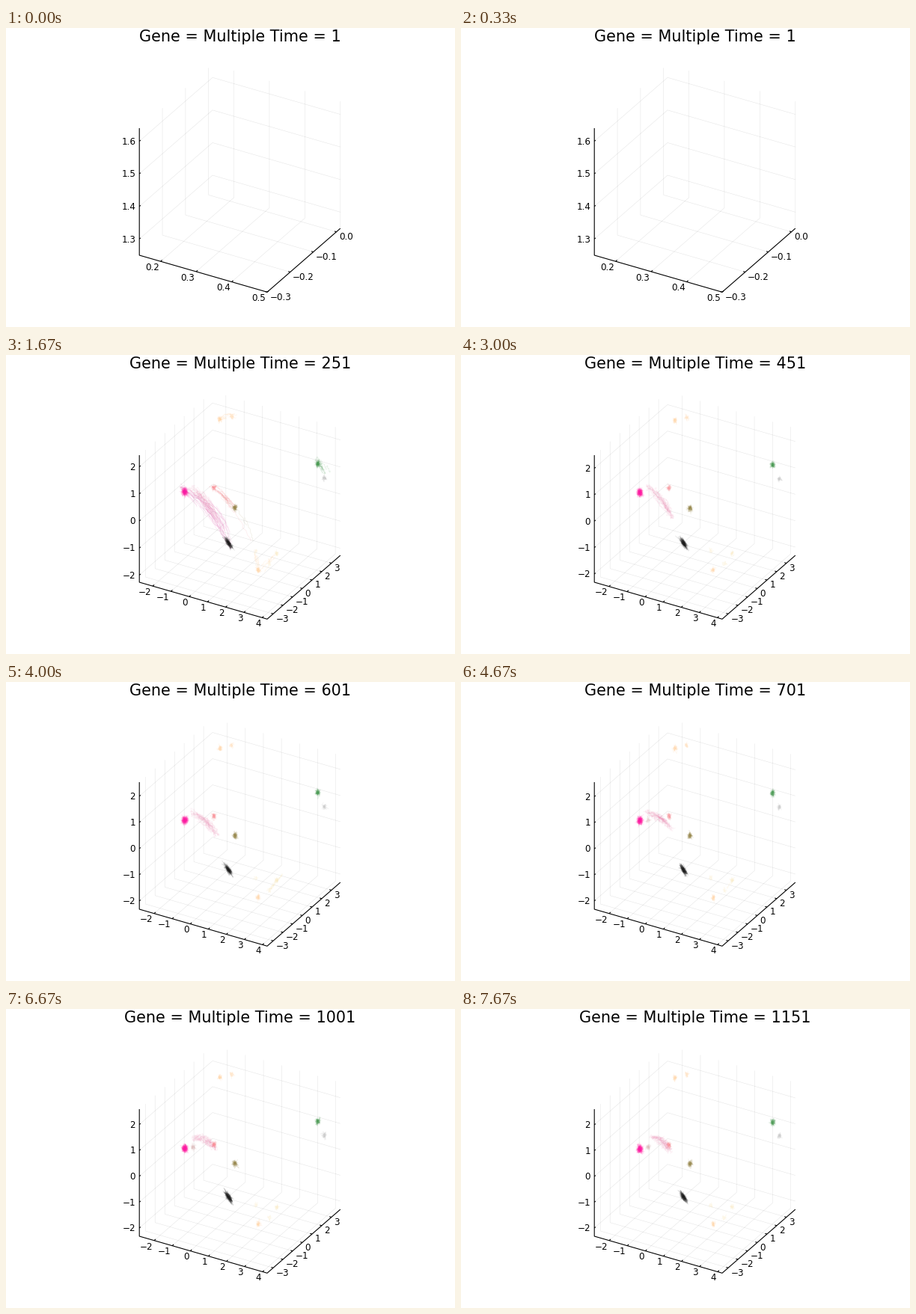
A matplotlib script that plays this animation: 600 by 400 pixels, repeating every 8 s.

```python
import numpy as np
import matplotlib.pyplot as plt
from matplotlib.animation import FuncAnimation
from matplotlib.collections import LineCollection

FRAMES, LOOP_MS, PX = 24, 8000, 0.72
TICK_SIZE, TITLE_SIZE = 11.9 * PX, 20.72 * PX

# Screen position of the box corner and its three edge vectors
ORIGIN = np.array([178.2, 304.0])
EX, EY, EZ = np.array([170.8, 49.3]), np.array([97.8, -85.2]), np.array([0, -170.0])

# Axis limits: at the start, once the trajectories have spread, in the long run
X_AXIS = (.14, .5), (-2.58, 4.28), (-2.82, 4.25)
Y_AXIS = (-.3, .017), (-3.62, 3.92), (-3.62, 3.92)
Z_AXIS = (1.25, 1.64), (-2.17, 2.38), (-2.32, 2.64)
START = .32, -.14, 1.44

MAGENTA, PINK, PURPLE, BLACK = "#ff1aa3", "#ee86b0", "#6e1457", "#111111"
ORCHID, RED, OLIVE, GREEN = "#dc3c9f", "#f9606a", "#85722a", "#2a8a35"
GREY, ORANGE, YELLOW, MAUVE, MIST = "#9a9a9a", "#ffbe72", "#f7d98a", "#c98f8f", "#8fa9a9"

# Steady states: colour, centre, number of walks, lean
CLUSTERS = [
    (MAGENTA, (239, 183), 42, 0), (BLACK, (297.5, 251.5), 28, 1.1), (RED, (278, 177), 9, 0),
    (OLIVE, (306, 204), 16, 0), (GREEN, (416.5, 145.5), 16, 0), (GREY, (425.5, 164.5), 6, 0),
    (ORANGE, (286, 86), 7, 0), (ORANGE, (301.5, 82), 4, 0), (ORANGE, (337, 288), 7, 0),
    (YELLOW, (362, 265), 4, 0), (YELLOW, (352, 279), 2, 0), (YELLOW, (334, 262), 2, 0),
]

# Passing flows: colour, start, end, bulge, number of trails, peak frame, duration
FLOWS = [
    (ORCHID, (235, 176), (300, 257), 17, 300, 2.8, 1.6),
    (PURPLE, (262, 211), (301, 258), 4, 50, 3, 1),
    (RED, (276, 177), (329, 250), 15, 36, 3, 1.2),
    (OLIVE, (290, 187), (329, 250), 9, 36, 3, 1.3),
    (RED, (277, 176), (306, 206), 3, 22, 5, 1.2),
    (MIST, (424, 146), (376, 213), -8, 44, 2.8, 1),
    (MIST, (376, 213), (348, 275), 6, 12, 2.8, 1),
    (GREEN, (415, 140), (428, 161), 2, 24, 4, 1.7),
    (ORANGE, (302, 258), (345, 287), 4, 26, 3, 1),
    (ORANGE, (340, 288), (360, 267), 2, 16, 3.8, 1.5),
    (ORANGE, (332, 262), (338, 287), 0, 8, 5, 1.3),
    (ORANGE, (284, 85), (307, 81), 3, 24, 3, 2),
    (YELLOW, (353, 278), (365, 259), 0, 9, 12, 1.5),
]


def ramp(k, first, last):
    return np.clip((k - first) / (last - first), 0, 1)


def limits(axis, k, settle):
    """Quick ease-out to the spread limits, then a slow creep to the final ones."""
    start, spread, final = np.array(axis)
    grow = 1 - (1 - ramp(k, 0, settle)) ** 2
    creep = 1 - np.exp(-max(k - 3, 0) / np.array([2, 10]))
    return start + (spread - start) * grow + (final - spread) * creep


def all_limits(k):
    return limits(X_AXIS, k, 3), limits(Y_AXIS, k, 3), limits(Z_AXIS, k, 2)


def ticks(lo, hi):
    """Fractions along the axis and labels of its ticks."""
    span = hi - lo
    step = .1 if span < 1 else .5 if span < 3 else 1
    values = np.arange(np.ceil(lo / step - 1e-6), np.floor(hi / step + 1e-6) + 1) * step
    text = "{:.0f}" if step == 1 else "{:.1f}"
    return [((v - lo) / span, text.format(v + 0.0).replace("-", "\u2212")) for v in values]


def at(u=0, v=0, w=0):
    return ORIGIN + u * EX + v * EY + w * EZ


def label(pos, text, align):
    ax.text(pos[0], pos[1] + 4.3, text, size=TICK_SIZE, ha=align, va="baseline")


def draw_axes(k):
    xlim, ylim, zlim = all_limits(k)
    grid, marks = [], [[at(w=1), at(), at(1), at(1, 1)]]
    for u, text in ticks(*xlim):
        grid.append([at(u), at(u, 1), at(u, 1, 1)])
        marks.append([at(u), at(u) + (2, -1.75)])
        label(at(u) + (-1.6, 7.5), text, "right")
    for v, text in ticks(*ylim):
        grid.append([at(1, v), at(0, v), at(0, v, 1)])
        marks.append([at(1, v), at(1, v) + (-2.6, -.75)])
        label(at(1, v) + (3.3, 6), text, "left")
    for w, text in ticks(*zlim):
        grid.append([at(0, 0, w), at(0, 1, w), at(1, 1, w)])
        marks.append([at(0, 0, w), at(0, 0, w) + (1.6, -1.3)])
        label(at(0, 0, w) + (-5, 0), text, "right")
    ax.add_collection(LineCollection(grid, colors="black", alpha=.1, linewidths=.55 * PX))
    ax.add_collection(LineCollection(marks, colors="black", linewidths=1.1 * PX))


def draw_trails(paths, colour):
    ax.add_collection(LineCollection(paths, colors=colour, alpha=.11, linewidths=.8 * PX))


def cluster(rng, centre, count, size, lean):
    """Random walks around a centre; busier clusters are a little larger."""
    walks = rng.normal(size=(count, 12, 2)) * (1.4 + .016 * size, 1.9 + .02 * size)
    walks[..., 0] *= 1 + .4 * lean
    walks[..., 1] += lean * walks[..., 0]
    return walks + centre


def flow(rng, start, end, bulge, count, jitter=.7):
    """Jittery trails along random stretches of arcs that bow out up to the bulge."""
    start, end = np.array(start, float), np.array(end, float)
    dx, dy = end - start
    normal = np.array([dy, -dx]) / np.hypot(dx, dy)
    paths = []
    for _ in range(count):
        a = rng.uniform(-.2, .65)
        s = np.clip(np.linspace(a, a + rng.uniform(.35, .6), 14), 0, 1)[:, None]
        arc = start + (end - start) * s + normal * bulge * rng.uniform() * np.sin(np.pi * s)
        paths.append(arc + rng.normal(0, 1.8, 2) + rng.normal(0, jitter, arc.shape))
    return paths


def fan(rng, start, end, count):
    s = np.linspace(0, 1, 20)[:, None]
    paths = []
    for _ in range(count):
        bend = rng.normal(0, 14, 2) * np.sin(np.pi * s)
        line = start + (np.array(end) + rng.normal(0, 4, 2) - start) * s
        paths.append(line + bend + rng.normal(0, .7, line.shape))
    return paths


def draw(k):
    ax.clear()
    ax.set(xlim=(0, 600), ylim=(400, 0))
    ax.axis("off")
    rng = np.random.default_rng(100 + k)
    draw_axes(k)

    origin = at(*[(p - lo) / (hi - lo) for p, (lo, hi) in zip(START, all_limits(k))])
    fan_count = round(16 * k * np.exp(-k * k / 2))
    for colour, centre, size, lean in CLUSTERS:
        draw_trails(fan(rng, origin, centre, fan_count), colour)

    for colour, start, end, bulge, count, peak, duration in FLOWS:
        active = round(count * np.exp(-((k - peak) / duration) ** 2)) if k else 0
        draw_trails(flow(rng, start, end, bulge, active), colour)

    # A loose flow whose far end swings upward
    swing, late = ramp(k, 8, 17), ramp(k, 17, 23)
    head = np.array([249, 177 - 4 * swing]) + late * np.array([7, -1])
    tail = (282 - 2 * swing, 222 - 37 * swing + 4 * late)
    draw_trails(flow(rng, head, tail, 7, round(42 * ramp(k, 3, 5)), 1.2), PINK)

    for colour, (x, y), size, lean in CLUSTERS:
        sink = ramp(k, 4, 23) * np.clip((250 - y) / 15, 0, 6)
        active = round(size * ramp(k, 2.5, 5))
        draw_trails(cluster(rng, (x, y + sink), active, size, lean), colour)
    draw_trails(cluster(rng, (250, 185), round(7 * ramp(k, 12, 16)), 7, 0), MAUVE)

    ax.text(312.7, 18.3, f"Gene = Multiple Time = {1 + 50 * k}", size=TITLE_SIZE,
            ha="center", va="baseline")
    return []


plt.rcParams["font.family"] = "DejaVu Sans"
fig = plt.figure(figsize=(6, 4), dpi=100, facecolor="white")
ax = fig.add_axes([0, 0, 1, 1])
anim = FuncAnimation(fig, draw, frames=FRAMES, interval=LOOP_MS / FRAMES, repeat=True,
                     repeat_delay=0)
plt.show()
```
